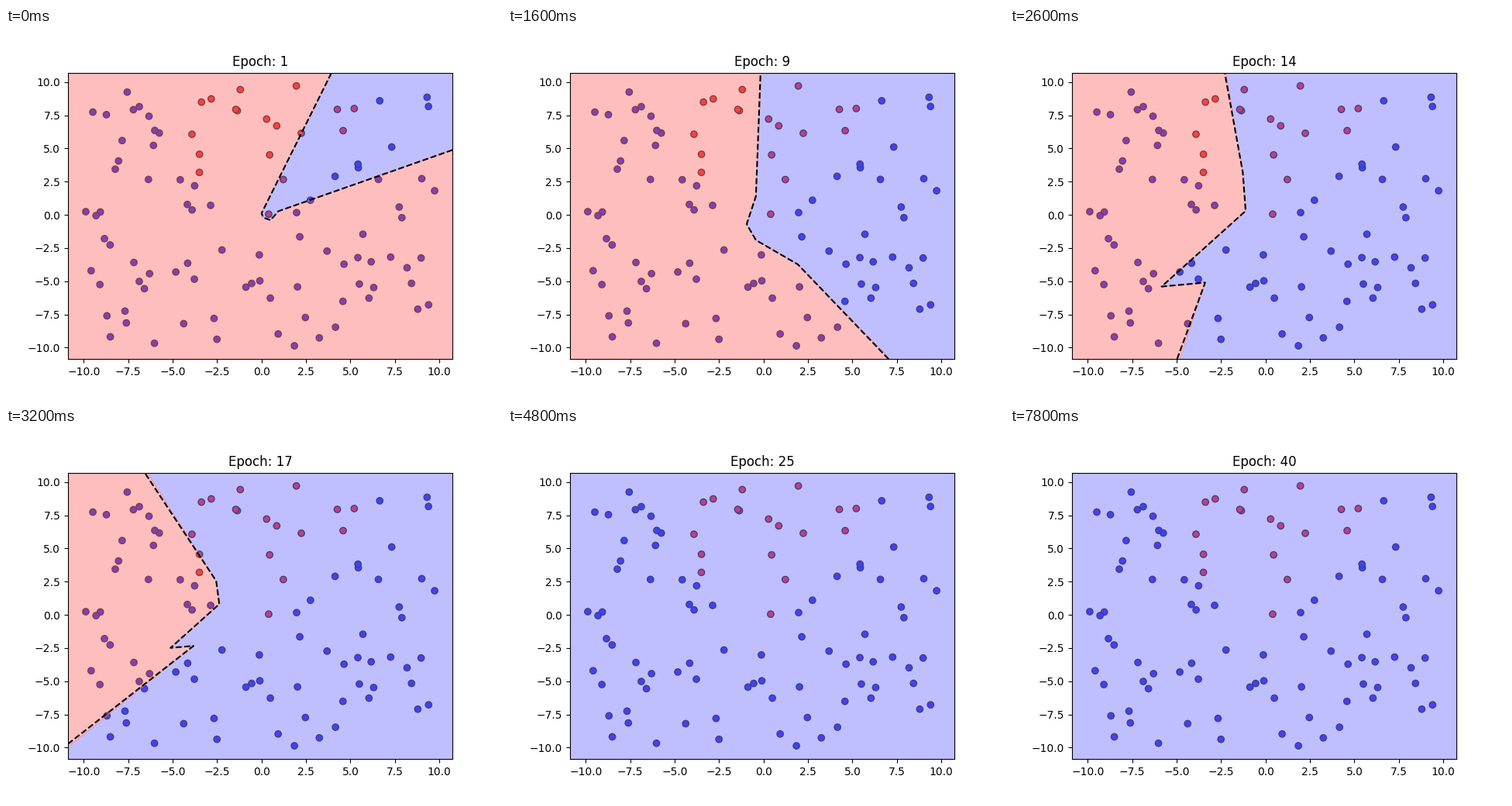
A matplotlib script for the animation above (8000 ms loop, 640 by 480 pixels).

```python
import numpy as np
import matplotlib.pyplot as plt
from matplotlib.animation import FuncAnimation
from matplotlib.patches import Polygon

EPOCHS = 40
FAR = 80

# Data: points inside the parabola are class red
np.random.seed(42)
px = np.random.uniform(-10, 10, 100)
py = np.random.uniform(-10, 10, 100)
is_red = py > 0.2 * px ** 2

x0, x1 = px.min() - 1, px.max() + 1
y0, y1 = py.min() - 1, py.max() + 1

# The boundary is a bent line: two rays (angles in degrees) joined by four
# corners (x + yj), each moving steadily between a few key epochs.
KEYS = [1, 5, 9, 14, 21, 25]
UPPER = [69.6, 79.1, 88.4, 97.7, 141, 143]
LOWER = [25.2, -41.2, -54.4, -105.3, -171.6, -185]
CORNERS = [
    [.12j, -.27 + .2j, -.43 + 1.4j, -1.28 + 3.2j, -4.25 + 1.7j, -11.5 + 3.2j],
    [.1 - .2j, -.38 - .4j, -.95 - .7j, -1.12 + .3j, -4.05 + 1.5j, -11.5 + 3.2j],
    [.5 - .4j, -.7j, -.43 - 1.9j, -5.85 - 5.4j, -4.15 + 1.4j, -11.5 + 3.2j],
    [.95 + .28j, .9 - 1.25j, 1.93 - 3.73j, -3.4 - 5.1j, -4.4 + 1.35j, -11.5 + 3.2j],
]


def xy(z):
    return np.column_stack([z.real, z.imag])


def ray(deg):
    return np.exp(1j * np.radians(deg))


def exit_point(z, deg):
    """Where a ray from z leaves the plot."""
    d = ray(deg)
    tx = ((x1 if d.real > 0 else x0) - z.real) / d.real
    ty = ((y1 if d.imag > 0 else y0) - z.imag) / d.imag
    return z + d * max(min(tx, ty), 0)


def region(corners, lower, upper):
    """Area between the bent line and a wide arc from lower to upper."""
    return xy(np.r_[corners, FAR * ray(np.linspace(lower, upper, 60))])


fig, ax = plt.subplots(figsize=(6.4, 4.8), dpi=100)
ax.set_xlim(x0, x1)
ax.set_ylim(y0, y1)
ax.scatter(px, py, c=np.where(is_red, "#ff0000", "#0000ff"), edgecolors="k")


def overlay(level):
    return ax.add_patch(Polygon([(0, 0)], fc=plt.cm.bwr(level), alpha=0.5,
                                lw=0, antialiased=False, zorder=1.5))


blue_area, red_area = overlay(0.25), overlay(0.75)
line, = ax.plot([], [], "k--", lw=1.5, zorder=2)
title = ax.set_title("")


def update(i):
    epoch = i + 1
    upper = np.interp(epoch, KEYS, UPPER)
    lower = np.interp(epoch, KEYS, LOWER)
    corners = np.array([np.interp(epoch, KEYS, c) for c in CORNERS])
    blue_area.set_xy(region(corners, lower, upper))
    red_area.set_xy(region(corners, lower, upper - 360))
    ends = exit_point(corners[-1], lower), exit_point(corners[0], upper)
    line.set_data(*xy(np.r_[ends[0], corners[::-1], ends[1]]).T)
    title.set_text(f"Epoch: {epoch}")
    return blue_area, red_area, line, title


anim = FuncAnimation(fig, update, frames=EPOCHS, interval=200,
                     repeat=True, repeat_delay=0, blit=False)
plt.show()
```
